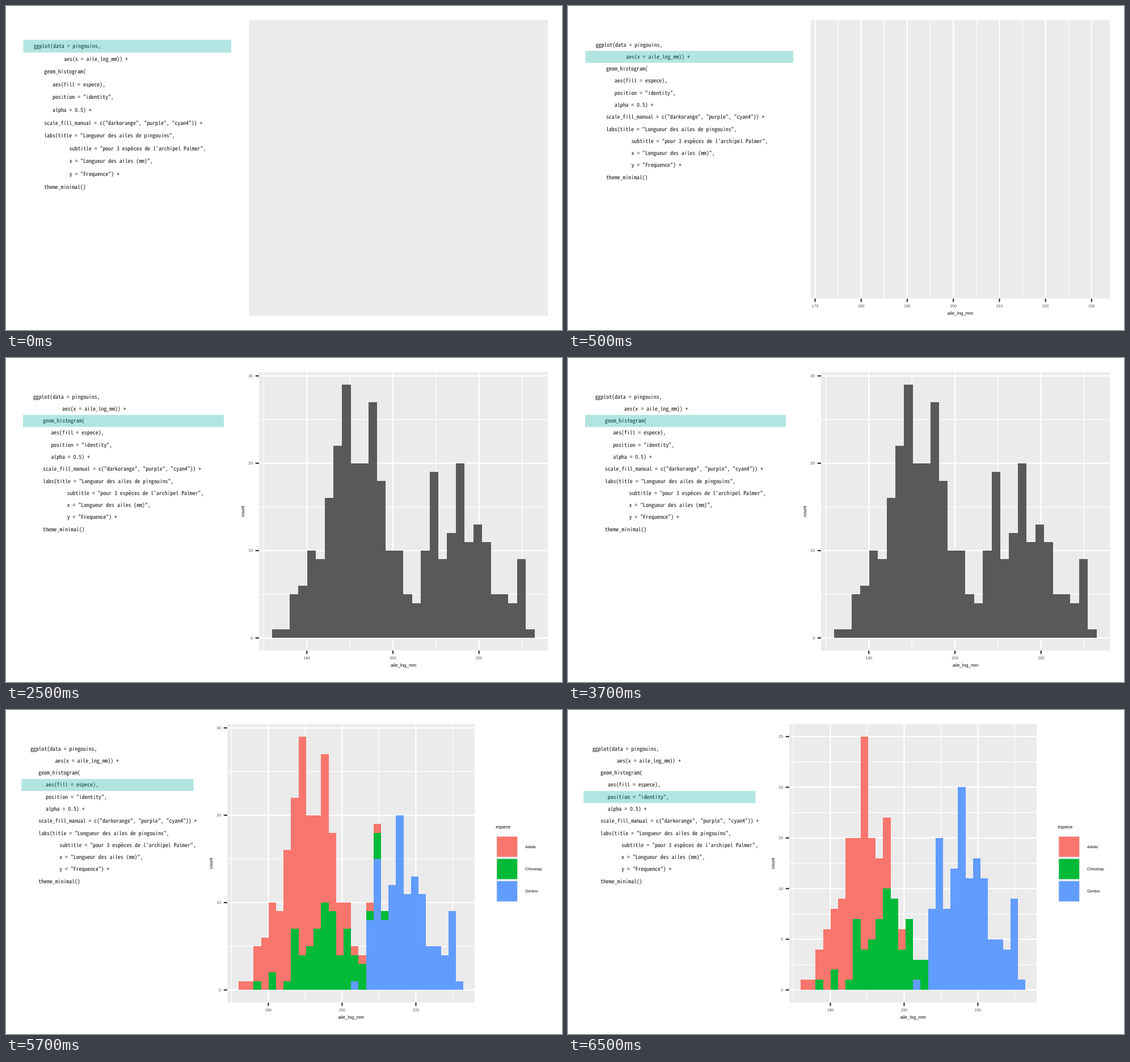
Animation of 980x572 px, one loop 8 s. Source, as an HTML page:

```html
<!DOCTYPE html>
<html lang="fr">
<head>
<meta charset="utf-8">
<title>ggplot histogram, step by step</title>
<style>
  html, body { margin: 0; width: 100%; height: 100%; overflow: hidden; background: #fff; }
  svg { display: block; width: 980px; height: 572px; }
  text { white-space: pre; text-rendering: geometricPrecision; }
  .code { font-family: "Noto Sans Mono CJK JP", "Noto Sans Mono CJK SC", "Noto Sans Mono", monospace; fill: #111; }
  .title, .label { font-family: "Liberation Sans", Arial, sans-serif; fill: #000; }
  .title { font-size: 8px; }
  .label { font-size: 6.9px; }
  .axis { fill: #4d4d4d; }
  .mid { text-anchor: middle; }
  .end { text-anchor: end; }
  .panel { fill: #ebebeb; }
  .major { stroke: #fff; stroke-width: 2.2; }
  .minor { stroke: #fff; stroke-width: 1.2; }
  .tick { stroke: #333; stroke-width: 2.2; }
  .mark { fill: #00a8a0; fill-opacity: .3; }
  .bars { shape-rendering: crispEdges; }
  .scene { visibility: hidden; animation: 8s step-end infinite; }
  #s0 { animation-name: a0; }
  #s1 { animation-name: a1; }
  #s2 { animation-name: a2; }
  #s3 { animation-name: a3; }
  #s4 { animation-name: a4; }
  @keyframes a0 { 0% { visibility: visible } 6.25%, 100% { visibility: hidden } }
  @keyframes a1 { 0% { visibility: hidden } 6.25% { visibility: visible } 31.25%, 100% { visibility: hidden } }
  @keyframes a2 { 0% { visibility: hidden } 31.25% { visibility: visible } 56.25%, 100% { visibility: hidden } }
  @keyframes a3 { 0% { visibility: hidden } 56.25% { visibility: visible } 81.25%, 100% { visibility: hidden } }
  @keyframes a4 { 0% { visibility: hidden } 81.25%, 100% { visibility: visible } }
</style>
</head>
<body>
<svg id="stage" viewBox="0 0 980 572"></svg>
<script>
// Each code line: indent level, text
const LINES = [
  [0, 'ggplot(data = pingouins,'],
  [3, 'aes(x = aile_lng_mm)) +'],
  [1, 'geom_histogram('],
  [2, 'aes(fill = espece),'],
  [2, 'position = "identity",'],
  [2, 'alpha = 0.5) +'],
  [1, 'scale_fill_manual = c("darkorange", "purple", "cyan4")) +'],
  [1, 'labs(title = "Longueur des ailes de pingouins",'],
  [4, 'subtitle = "pour 3 espèces de l\'archipel Palmer",'],
  [4, 'x = "Longueur des ailes (mm)",'],
  [4, 'y = "Frequence") +'],
  [1, 'theme_minimal()']
];
const WIDE = [48.9, 67.2, 82, 102.3, 111.7];
const MEDIUM = [47.9, 65, 79.4, 99, 107.8];
const NARROW = [42.9, 57.3, 70, 86.4, 94.3];
const ADVANCE = 4.9;

// Counts in 30 bins
const total = [1, 1, 5, 6, 10, 9, 16, 22, 29, 20, 20, 27, 18, 10, 10,
  5, 4, 10, 19, 9, 12, 20, 11, 13, 11, 5, 5, 4, 9, 1];
const chinstrap = [0, 0, 1, 0, 2, 0, 1, 7, 4, 5, 7, 10, 9, 4, 7, 3, 3, 1, 3, 1];
const gentoo = total.map((n, i) => i > 19 ? n : ({ 15: 1, 17: 8, 18: 15, 19: 8 })[i] || 0);
const other = total.map((n, i) => (chinstrap[i] || 0) + gentoo[i]);
const adelie = total.map((n, i) => n - other[i]);
const RED = '#f8766d', GREEN = '#00ba38', BLUE = '#619cff', GREY = '#595959';
const TOP = 24.7, BOTTOM = 516.5, ZERO = 494.2;

const rect = (x, y, w, h, attrs) => `<rect x="${x}" y="${y}" width="${w}" height="${h}" ${attrs}/>`;
const line = (x1, y1, x2, y2, cls) => `<line x1="${x1}" y1="${y1}" x2="${x2}" y2="${y2}" class="${cls}"/>`;
const text = (x, y, s, cls, more = '') => `<text x="${x}" y="${y}" class="${cls}" ${more}>${s}</text>`;
const range = (from, to, step) =>
  Array.from({ length: Math.floor((to - from) / step + 1.001) }, (_, i) => from + i * step);

function code(indents, pitch, first, active, left, right) {
  const lines = LINES.map(([level, s], i) =>
    text(indents[level], first + i * pitch, s, 'code')).join('');
  const y = first - 3 + (active - 0.5) * pitch;
  return lines + rect(left, y, right - left, pitch, 'class="mark"');
}

const panel = (left, right, bottom) =>
  rect(left, TOP, right - left, bottom - TOP, 'class="panel"');

// Grid and axis labels; at() maps millimetres or counts to pixels
function xAxis(at, majors, minors, mid) {
  return minors.map(v => line(at(v), TOP, at(v), BOTTOM, 'minor')).join('') +
    majors.map(v => line(at(v), TOP, at(v), BOTTOM, 'major') +
      line(at(v), BOTTOM, at(v), BOTTOM + 6, 'tick') +
      text(at(v), 532.4, v, 'label axis mid')).join('') +
    text(mid, 545, 'aile_lng_mm', 'title mid');
}

function yAxis(unit, left, right, step, max) {
  const at = v => ZERO - v * unit;
  const minors = range(step / 2, max, step);
  const titleX = left - 25.6;
  return minors.map(v => line(left, at(v), right, at(v), 'minor')).join('') +
    range(0, max, step).map(v => line(left, at(v), right, at(v), 'major') +
      line(left - 6.3, at(v), left, at(v), 'tick') +
      text(left - 11, at(v) + 2.4, v, 'label axis end')).join('') +
    text(titleX, 270.7, 'count', 'title mid', `transform="rotate(-90 ${titleX} 270.7)"`);
}

function bars(counts, left, width, unit, color) {
  const d = counts.map((n, i) => n
    ? `M${left + i * width} ${ZERO}v${-n * unit}h${width}v${n * unit}z` : '').join('');
  return `<path class="bars" d="${d}" fill="${color}"/>`;
}

function legend() {
  const keys = [['Adelie', RED], ['Chinstrap', GREEN], ['Gentoo', BLUE]];
  return text(863.3, 208.6, 'espece', 'title') +
    rect(863.8, 222, 38.8, 117.6, 'fill="#f0f0f0"') +
    keys.map(([name, color], i) => rect(865.3, 223.6 + i * 39.3, 35.8, 35.6, `fill="${color}"`) +
      text(915, 243.6 + i * 39.3, name, 'label')).join('');
}

const grid = (at, mid) => xAxis(at, [180, 200, 220], [170, 190, 210, 230], mid);

function species(unit, step, max, layers) {
  return panel(390, 826, BOTTOM) +
    yAxis(unit, 390, 826, step, max) +
    grid(v => 592.4 + (v - 200) * 6.5, 608.3) +
    layers.map(([n, c]) => bars(n, 410, 13.21, unit, c)).join('') + legend();
}

const tight = (indents, active, left, right) => code(indents, 21.29, 71.5, active, left, right);

const scenes = [
  code(WIDE, 22.62, 73.9, 0, 30.5, 397) + panel(428, 955, 546.8),

  tight(WIDE, 1, 30.5, 397) + panel(428, 955, BOTTOM) +
    xAxis(v => 679.2 + (v - 200) * 8.123, range(170, 230, 10), range(175, 225, 10), 691.5),

  tight(MEDIUM, 2, 30, 384) + panel(446, 955, BOTTOM) +
    yAxis(15.42, 446, 955, 10, 30) +
    grid(v => 682 + (v - 200) * 7.585, 700.6) +
    bars(total, 469, 15.42, 15.42, GREY),

  tight(NARROW, 3, 27.3, 330.5) +
    species(15.42, 10, 30, [[total, RED], [other, GREEN], [gentoo, BLUE]]),

  tight(NARROW, 4, 27.3, 330.5) +
    species(17.89, 5, 25, [[adelie, RED], [chinstrap, GREEN], [gentoo, BLUE]])
];

const stage = document.getElementById('stage');
stage.innerHTML = scenes.map((s, i) => `<g class="scene" id="s${i}">${s}</g>`).join('');

// Monospace fonts differ in width per em, so size the code by its advance
const pen = document.createElement('canvas').getContext('2d');
pen.font = '100px ' + getComputedStyle(stage.querySelector('.code')).fontFamily;
const size = 100 * ADVANCE / pen.measureText('0').width;
stage.querySelectorAll('.code').forEach(t => t.style.fontSize = size + 'px');
</script>
</body>
</html>
```
